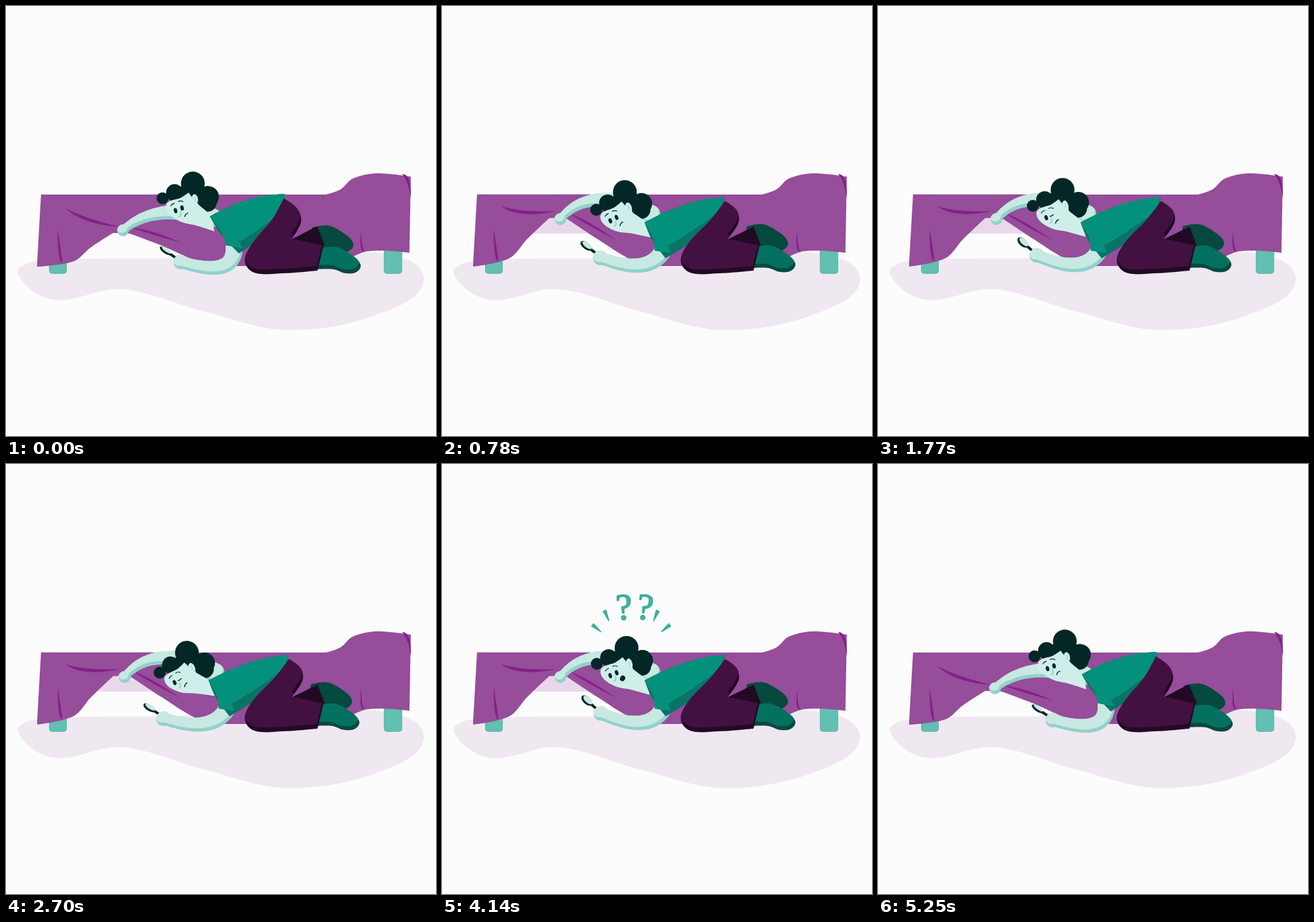
Write an HTML page with a canvas that moves like this. It is 650 by 650 pixels and loops after 5.55 s.

```html
<!DOCTYPE html>
<html lang="en">
<head>
<meta charset="utf-8">
<title>Looking under the bed</title>
<style>
html, body { margin: 0; width: 100%; height: 100%; overflow: hidden; background: #fcfcfc; }
canvas { display: block; width: 100vw; height: 100vh; }
</style>
</head>
<body>
<canvas id="stage" width="650" height="650"></canvas>
<script>
const ctx = document.getElementById('stage').getContext('2d');
const LOOP = 5550, STEP = 30;
const C = {
  paper: '#fcfcfc', floor: '#f0e8f1', under: '#e9d8ea', leg: '#62bfb1',
  cover: '#964d9a', fold: '#851f8a', skin: '#d0eee9', limb: '#c8e8e2', shade: '#90d2c9',
  hair: '#032726', shirt: '#04917b', shirtDark: '#0a7366', pants: '#421141', pantsDark: '#220a25',
  boot: '#047160', bootDark: '#06493f', mark: '#2ba893'
};

const mix = (a, b, k) => a + (b - a) * k;
const clamp = v => Math.min(1, Math.max(0, v));
const span = (t, from, to) => clamp((t - from) / (to - from));
const ease = p => (1 - Math.cos(Math.PI * p)) / 2;
const easeOut = p => Math.sin(p * Math.PI / 2);

// Outlines are a few "x,y" points joined smoothly; "!" marks a corner.
const outline = s => s.split(' ').map(w => [...w.split(',').map(parseFloat), w.endsWith('!')]);
const floor = outline('18,405 45,386 250,381 560,373 632,412 560,467 425,490 300,462 175,428 72,444');
const cover = outline('53,285! 484,285! 506,277 524,261 560,253 612,258! 610,373! 545,371 500,393! 320,393! ' +
  '285,384 235,362 187,344! 162,343! 128,365 102,386 47,394!');
const body = outline('308,318! 345,300 385,288 421,284! 420,320 385,352 352,374! 325,345');
const sleeve = outline('308,318! 340,316 346,345! 358,366! 333,362! 326,342');
const pants = outline('420,291! 440,306 446,326 432,352! 480,362! 471,400! 420,404 375,403 361,385 374,357 403,322');
const farLeg = outline('425,356! 470,333! 482,362! 440,372!');
const boot = outline('474,367! 498,364 522,376 536,391 530,402 513,404 495,398 468,398!');
const face = outline('241,310 262,301 273,293! 288,310 309,326! 314,350! 285,342 262,337 243,324');

// How each part follows the pose, from resting (u = 0) to peeking (u = 1).
const lift = u => (x, y) => [x, y - 24 * u * Math.exp(-(((x - 178) / 60) ** 2))];
const lean = u => (x, y) => [x + u * (310 - y) * 0.22, y + u * (9 - (x - 308) * 0.04)];
const sway = u => (x, y) => [x + u * 0.16 * Math.max(0, 340 - y), y + u * 0.08 * Math.max(0, 340 - y)];
const stay = (x, y) => [x, y];

function smooth(points, move = stay) {
  const p = points.map(([x, y, sharp]) => [...move(x, y), sharp]);
  const n = p.length, path = new Path2D();
  const handle = (i, len) => {
    if (p[i][2]) return [0, 0];
    const a = p[(i + n - 1) % n], b = p[(i + 1) % n];
    const k = len / 3 / Math.hypot(b[0] - a[0], b[1] - a[1]);
    return [(b[0] - a[0]) * k, (b[1] - a[1]) * k];
  };
  path.moveTo(p[0][0], p[0][1]);
  p.forEach(([x, y], i) => {
    const j = (i + 1) % n, [ex, ey] = p[j], len = Math.hypot(ex - x, ey - y);
    const h = handle(i, len), g = handle(j, len);
    path.bezierCurveTo(x + h[0], y + h[1], ex - g[0], ey - g[1], ex, ey);
  });
  return path;
}

// A tapered limb along a quadratic curve, ending in a round hand.
function limb([x0, y0], [cx, cy], [x1, y1], r0, r1, hand) {
  const path = new Path2D();
  const disc = (x, y, r) => { path.moveTo(x + r, y); path.arc(x, y, r, 0, Math.PI * 2); };
  for (let i = 0; i <= 60; i++) {
    const t = i / 60, s = 1 - t;
    disc(s * s * x0 + 2 * s * t * cx + t * t * x1, s * s * y0 + 2 * s * t * cy + t * t * y1, mix(r0, r1, t));
  }
  disc(x1, y1, hand);
  return path;
}

function fill(path, color) {
  ctx.fillStyle = color;
  ctx.fill(path);
}
// Dark rim along the side facing away from (dx, dy).
function shaded(path, light, dark, dx, dy) {
  fill(path, dark);
  ctx.save();
  ctx.clip(path);
  ctx.translate(dx, dy);
  fill(path, light);
  ctx.restore();
}
function oval(x, y, rx, ry, color, turn = 0) {
  const path = new Path2D();
  path.ellipse(x, y, rx, ry, turn, 0, Math.PI * 2);
  fill(path, color);
}
function block(x, y, w, h, r, color) {
  const path = new Path2D();
  path.roundRect(x, y, w, h, r);
  fill(path, color);
}
function line(x1, y1, cx, cy, x2, y2, color, width) {
  ctx.beginPath();
  ctx.moveTo(x1, y1);
  ctx.quadraticCurveTo(cx, cy, x2, y2);
  ctx.strokeStyle = color;
  ctx.lineWidth = width;
  ctx.lineCap = 'round';
  ctx.stroke();
}
// A crease pointed at both ends.
function crease(move, x0, y0, cx, cy, x1, y1, dx, dy) {
  const path = new Path2D();
  path.moveTo(...move(x0, y0));
  path.quadraticCurveTo(...move(cx, cy), ...move(x1, y1));
  path.quadraticCurveTo(...move(cx + dx, cy + dy), ...move(x0, y0));
  fill(path, C.fold);
}

function drawBed(u) {
  fill(smooth(floor), C.floor);
  block(65, 375, 27, 30, 5, C.leg);
  block(571, 360, 28, 45, 5, C.leg);
  block(130, 312, 110, 32, 0, C.under);
  const move = lift(u);
  fill(smooth(cover, move), C.cover);
  crease(move, 89, 305, 115, 330, 172, 334, 0, -10);
  crease(move, 190, 335, 220, 338, 263, 357, 0, 8);
  crease(move, 78, 338, 84, 375, 85, 388, -6, 12);
  crease(move, 537, 339, 537, 365, 542, 371, -4, 8);
  crease(move, 599, 254, 613, 254, 612, 290, -4, 12);
}

function drawLegs(u) {
  for (const [x, y, light] of [[-11, -32, C.bootDark], [0, 0, C.boot]]) {
    ctx.save();
    ctx.translate(x - 2 * u, y - 2 * u);
    shaded(smooth(boot), light, C.bootDark, -2, -6);
    ctx.restore();
  }
  fill(smooth(farLeg, sway(u)), C.pantsDark);
  shaded(smooth(pants, sway(u)), C.pants, C.pantsDark, -1, -7);
}

function drawHead(u, dip, squint, gasp) {
  ctx.save();
  ctx.translate(mix(302, 300, u), mix(310, 319, u) + 4 * dip);
  ctx.rotate(mix(0.035, 0, u) - 0.14 * dip);
  ctx.translate(-300, -320);
  for (const [x, y, r] of [[234, 303, 9], [252, 294, 13], [275, 292, 16], [279, 279, 18], [303, 298, 16], [302, 307, 14]])
    oval(x, y, r, r, C.hair);
  fill(smooth(face), C.skin);
  oval(283, 302, 4.5, 7, C.skin, -0.25);
  line(282, 300, 285, 302, 283, 306, C.shade, 1);
  line(247, 314, 248, 311, 252, 310, C.hair, 1.2);
  line(258, 307, 261, 305, 265, 307, C.hair, 1.2);
  oval(254.3, 321, 2.6, 4, C.hair, -0.3);
  if (squint) line(260, 319, 263, 318.5, 265, 316.5, C.hair, 1.4);
  else oval(264, 316.5, 2.6, 4, C.hair, -0.3);
  line(262, 322, 264, 328, 260, 329.5, C.shade, 1.8);
  if (gasp) oval(273, 325, 3.8 * gasp, 4.4 * gasp, C.hair, 0.5);
  else line(268.5, 329.5, 269, 325.5, 273, 324, C.hair, 1.4);
  ctx.restore();
}

function drawGlass(u, dip) {
  ctx.save();
  ctx.translate(mix(241, 219, u) - 2.5 * dip, mix(370, 357.5, u) + 11 * dip);
  ctx.rotate(mix(0.6, 0.72, u) - 0.15 * dip);
  line(8, 0, 13, 0, 18, 0, C.hair, 4);
  const ry = mix(4, 5.6, u) - dip;
  oval(0, 0, 10, ry, C.hair);
  oval(0.8, -1.8, 8.6, ry - 1.4, C.limb);
  ctx.restore();
}

function drawMarks(size, alpha, rise) {
  ctx.save();
  ctx.globalAlpha = alpha;
  ctx.translate(286, 260 - rise);
  ctx.scale(size, size);
  ctx.fillStyle = ctx.strokeStyle = C.mark;
  ctx.lineWidth = 1.8;
  ctx.lineJoin = 'round';
  ctx.font = '56px "Liberation Serif", serif';
  ctx.textAlign = 'center';
  for (const side of [-1, 1]) {
    ctx.save();
    ctx.translate(5 + 16 * side, -43);
    ctx.rotate(0.045 + 0.095 * side);
    ctx.fillText('?', 0, 18.5);
    ctx.strokeText('?', 0, 18.5);
    ctx.restore();
    // Two rays on each side, pointing in at the head.
    for (const [x, y, turn] of [[37, -30, 0.4], [52, -11, 0.88]]) {
      ctx.save();
      ctx.translate(x * side, y);
      ctx.rotate(turn * side);
      ctx.beginPath();
      ctx.moveTo(-2.2, -8);
      ctx.lineTo(2.2, -8);
      ctx.lineTo(0, 8);
      ctx.closePath();
      ctx.fill();
      ctx.stroke();
      ctx.restore();
    }
  }
  ctx.restore();
}

function draw(t) {
  const u = ease(span(t, 0, 540)) - ease(span(t, 4800, 5250));
  const pop = span(t, 3540, 4110), gone = span(t, 4110, 4320);
  const dip = easeOut(span(t, 690, 990)) - ease(span(t, 1560, 1770))
    + ease(span(t, 2490, 2700)) - ease(span(t, 2970, 3540));
  const squint = t >= 870 && t < 3270;
  const gasp = clamp(span(t, 3570, 3750) - span(t, 4860, 5040));

  ctx.fillStyle = C.paper;
  ctx.fillRect(0, 0, 650, 650);
  drawBed(u);
  const farArm = limb([mix(312, 316, u), mix(320, 315, u)], [225, mix(297, 268, u)],
    [mix(177, 179, u), mix(339, 322, u)], 14, 6, 9);
  shaded(farArm, C.limb, C.shade, -2, -5);
  drawHead(u, dip, squint, gasp);
  drawGlass(u, dip);
  const nearArm = limb([mix(345, 333, u), mix(366, 372, u)], [mix(345, 310, u), mix(412, 408, u)],
    [mix(264, 240, u) - 2 * dip, mix(387, 377, u) + 8 * dip], 13, 9, 11);
  shaded(nearArm, C.limb, C.shade, -2, -5);
  shaded(smooth(body, lean(u)), C.shirt, C.shirtDark, 2, -18);
  fill(smooth(sleeve, lean(u)), C.shirt);
  drawLegs(u);
  if (pop > 0 && gone < 1)
    drawMarks(mix(0.6, 1, easeOut(pop)), clamp(pop * 2.5) * (1 - gone), 4 * gone);
}

const start = performance.now();
function tick() {
  const t = (performance.now() - start) % LOOP;
  draw(Math.floor(t / STEP) * STEP);
  requestAnimationFrame(tick);
}
tick();
</script>
</body>
</html>
```
